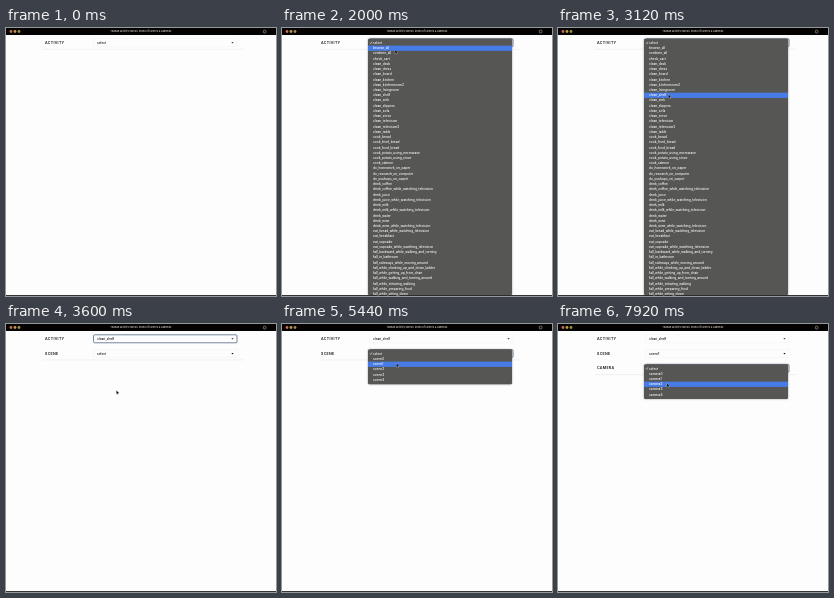
Animation of 270x268 px, one loop 8 s. Source, as an HTML page with a canvas:

```html
<!DOCTYPE html>
<html lang="en">
<head>
<meta charset="utf-8">
<title>Activity picker</title>
<style>
html, body { margin: 0; width: 100%; height: 100%; overflow: hidden; background: #fdfdfd; }
canvas { display: block; width: 270px; height: 268px; }
</style>
</head>
<body>
<canvas></canvas>
<script>
const LOOP = 8000, PITCH = 5.23, APPEAR = 240, TRAVEL = 300;
const canvas = document.querySelector('canvas');
const ctx = canvas.getContext('2d');
const ratio = window.devicePixelRatio || 1;
canvas.width = 270 * ratio;
canvas.height = 268 * ratio;
ctx.scale(ratio, ratio);
ctx.textBaseline = 'middle';

// A trailing "+" adds a second entry done while watching television.
const groups = {
  browse: 'all', combine: 'all', check: 'cart',
  clean: `desk dress board kitchen kitchenroom2 livingroom shelf sink slippers sofa stove
    television television2 table`,
  cook: 'bread fried_bread food_bread potato_using_microwave potato_using_stove salmon',
  do: 'homework_on_paper research_on_computer pushups_on_carpet',
  drink: 'coffee+ juice+ milk+ water wine+',
  eat: 'bread_while_watching_television breakfast cupcake+',
  fall: `backward_while_walking_and_turning in_bathroom sideways_while_moving_around
    while_climbing_up_and_down_ladder while_getting_up_from_chair
    while_walking_and_turning_around while_initiating_walking while_preparing_food
    while_sitting_down`
};
const activities = Object.entries(groups).flatMap(([verb, list]) =>
  list.split(/\s+/).flatMap(word => {
    const name = verb + '_' + word.replace('+', '');
    return word.endsWith('+') ? [name, name + '_while_watching_television'] : [name];
  }));
const numbered = name => Array.from({ length: 5 }, (_, i) => name + i);

// The pointer opens a menu at x, then moves to the picked item between hover and settle.
const rows = [
  { label: 'ACTIVITY', items: activities, pick: 10, x: 113.5, open: 640, hover: 1700, settle: 3120, close: 3600 },
  { label: 'SCENE', items: numbered('scene'), pick: 2, x: 117.5, open: 4320, hover: 4400, settle: 5440, close: 6080 },
  { label: 'CAMERA', items: numbered('camera'), pick: 3, x: 112, open: 6960, hover: 7040, settle: 7920, close: LOOP }
];
rows.forEach((row, i) => {
  row.y = 14.8 + i * 14.8;
  row.shown = i ? rows[i - 1].close : 0;
  row.items.unshift('select');
});

function glide(a, b, start, end, t) {
  const u = Math.min(1, Math.max(0, (t - start) / (end - start)));
  const k = u * u * (3 - 2 * u);
  return { x: a.x + (b.x - a.x) * k, y: a.y + (b.y - a.y) * k };
}

function pointerAt(t) {
  return rows.reduce((tip, row) => {
    const click = { x: row.x, y: row.y + 1.5 };
    const target = { x: row.x - 3, y: row.y + row.pick * PITCH - 0.6 };
    const arrived = glide(tip, click, row.open - TRAVEL, row.open, t);
    return t < row.hover ? arrived : glide(click, target, row.hover, row.settle, t);
  }, { x: 120, y: 32 });
}

function box(x, y, w, h, color) {
  ctx.fillStyle = color;
  ctx.fillRect(x, y, w, h);
}

function dot(x, y, r, color) {
  ctx.fillStyle = color;
  ctx.beginPath();
  ctx.arc(x, y, r, 0, 7);
  ctx.fill();
}

function text(str, x, y, color, size = 3.2, weight = 500, spacing = 0, align = 'left') {
  ctx.font = `${weight} ${size}px Inter, sans-serif`;
  ctx.letterSpacing = spacing + 'px';
  ctx.textAlign = align;
  ctx.fillStyle = color;
  ctx.fillText(str, x, y);
}

function outline(x, y, w, h, r, color, width) {
  ctx.strokeStyle = color;
  ctx.lineWidth = width;
  ctx.beginPath();
  ctx.roundRect(x, y, w, h, r);
  ctx.stroke();
}

function polygon(points, x, y) {
  ctx.beginPath();
  for (const [dx, dy] of points) ctx.lineTo(x + dx, y + dy);
  ctx.closePath();
}

function drawWindow() {
  box(0, 0, 270, 268, '#fdfdfd');
  box(0, 0, 270, 7, '#050302');
  box(0, 267, 270, 1, '#333');
  ['#c66f5c', '#c49a4c', '#a28c48'].forEach((c, i) => dot(5 + i * 4, 3.5, 1.4, c));
  text('Human activity videos: index of scenes & cameras', 135, 3.5, '#c8c4c0', 2.5, 600, 0, 'center');
  outline(257.3, 2.2, 2.7, 2.7, 0.7, '#aaa', 0.6);
}

function drawRow(row, t, focused) {
  const { y } = row;
  text(row.label, 39, y, '#111', 3.6, 600, 0.3);
  outline(87.5, y - 4, 143.5, 8, 1, focused ? '#66778f' : '#f2f2f2', focused ? 0.9 : 0.6);
  text(row.items[t >= row.close ? row.pick : 0], 91, y + 0.2, '#111');
  ctx.fillStyle = '#111';
  polygon([[-1.1, -0.6], [1.1, -0.6], [0, 0.8]], 226.5, y);
  ctx.fill();
}

function drawMenu(row, tip) {
  const top = row.y - 4;
  const bottom = Math.min(267, row.y + row.items.length * PITCH - 0.8);
  const itemY = i => row.y + 0.2 + i * PITCH;
  const active = Math.max(0, Math.round((tip.y - row.y) / PITCH));
  ctx.save();
  ctx.shadowColor = 'rgba(0,0,0,.45)';
  ctx.shadowBlur = 2 * ratio;
  ctx.fillStyle = '#565654';
  ctx.beginPath();
  ctx.roundRect(86, top, 144, bottom - top, 1.2);
  ctx.fill();
  ctx.restore();
  box(86, itemY(active - 0.5), 144, PITCH, '#477be6');
  row.items.forEach((item, i) => text(item, 91, itemY(i), '#fff'));
  ctx.strokeStyle = '#fff';
  ctx.lineWidth = 0.5;
  ctx.beginPath();
  ctx.moveTo(88, row.y);
  ctx.lineTo(88.8, row.y + 1);
  ctx.lineTo(90, row.y - 1.2);
  ctx.stroke();
}

function drawPointer({ x, y }) {
  polygon([[0, 0], [0, 3.4], [0.8, 2.7], [1.4, 4], [2, 3.7], [1.4, 2.5], [2.5, 2.4]], x, y);
  ctx.strokeStyle = '#ddd';
  ctx.lineWidth = 0.5;
  ctx.stroke();
  ctx.fillStyle = '#111';
  ctx.fill();
}

function frame(now) {
  const t = now % LOOP, tip = pointerAt(t);
  const shown = rows.filter(row => t >= row.shown);
  const focus = rows.findLast(row => t >= row.open);
  drawWindow();
  box(37, shown.at(-1).y + 6, 201, 0.7, '#ececec');
  shown.forEach(row => drawRow(row, t, row === focus));
  if (focus && t < focus.close) drawMenu(focus, tip);
  if (t >= APPEAR) drawPointer(tip);
  requestAnimationFrame(frame);
}
requestAnimationFrame(frame);
</script>
</body>
</html>
```
